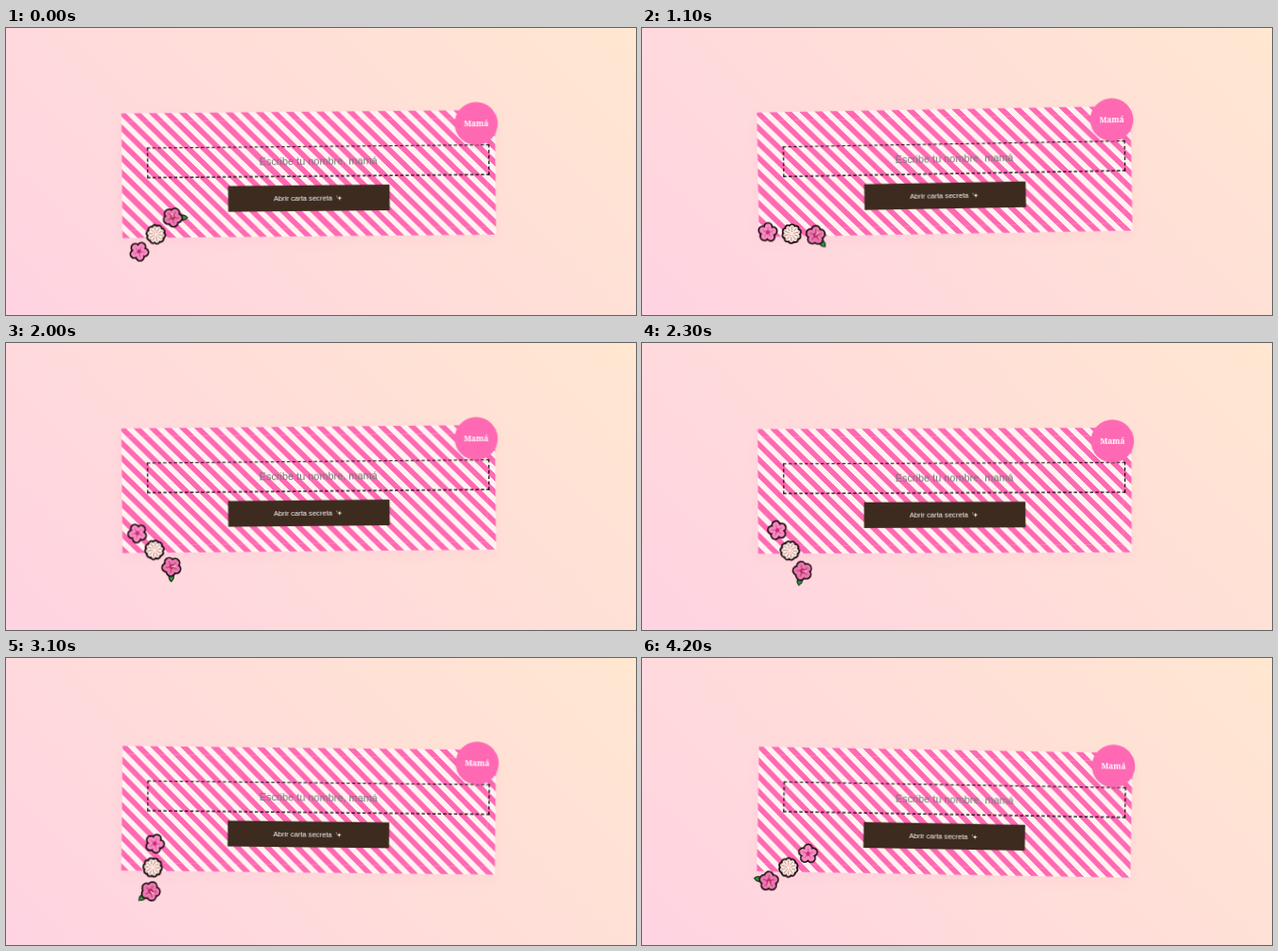
Animation, 666 px wide and 304 px high, one loop 4300 ms. Source, as an HTML page:

```html
<!DOCTYPE html>
<html lang="es">
<head>
<meta charset="utf-8">
<style>
html, body { margin: 0; width: 100%; height: 100%; overflow: hidden; }
body { position: relative; background: linear-gradient(45deg, #ffd3e2, #ffe7d1); font-family: Arial, "Liberation Sans", sans-serif; }
#scene { position: absolute; left: 319.7px; top: 151.75px; transform: scale(.569); }
#card {
  position: absolute; left: -347px; top: -116px; width: 694px; height: 232px;
  box-sizing: border-box; border: 15px solid;
  border-image: repeating-linear-gradient(45deg, #ff69b4 0 10px, #fff3f0 10px 20px) 15 fill;
  box-shadow: 0 10px 24px rgba(255, 105, 180, .07);
}
#card > * { position: absolute; box-sizing: border-box; display: flex; align-items: center; justify-content: center; white-space: pre; }
#name { left: 32px; top: 49px; width: 636px; height: 57px; border: 2px dashed #000; color: #757575; font-size: 19.2px; }
#open { left: 182px; top: 122px; width: 300px; height: 48px; background: #3d2b1f; color: #fff; font-size: 13.333px; }
#badge {
  right: -20px; top: -30px; width: 80px; height: 80px; border-radius: 50%;
  background: #ff69b4; color: #fff; box-shadow: 0 4px 10px rgba(0, 0, 0, .06);
  font: 800 14.6px "Noto Serif", serif;
}
#card > #flowers { left: 0; top: 0; width: 664px; height: 202px; overflow: visible; display: block; }
</style>
</head>
<body>
<div id="scene">
  <div id="card">
    <div id="name">Escribe tu nombre, mamá</div>
    <div id="open">Abrir carta secreta <svg width="18" height="16" fill="#fff8e6"><path d="M10 4l1 3.500 3.500 1-3.500 1-1 3.500-1-3.500-3.500-1 3.500-1z"/><circle cx="5" cy="5" r="1"/></svg></div>
    <div id="badge">Mamá</div>
    <svg id="flowers"><g id="spin"></g></svg>
  </div>
</div>
<script>
const LOOP = 4300, STEP = 100;
const card = document.getElementById('card');
const spin = document.getElementById('spin');

// n circles of radius r placed evenly on a ring
const ring = (n, dist, r, attrs) => Array.from({ length: n }, (_, i) => {
  const a = (i / n) * 2 * Math.PI - Math.PI / 2;
  return `<circle cx="${dist * Math.cos(a)}" cy="${dist * Math.sin(a)}" r="${r}" ${attrs}/>`;
}).join('');

const rays = (n, from, to, color, width) => Array.from({ length: n }, (_, i) =>
  `<path d="M0 ${-from}V${-to}" stroke="${color}" stroke-width="${width}" transform="rotate(${i * 360 / n})"/>`).join('');

const flower = (x, n, dist, r, fill, inside, behind = '') =>
  `<g transform="translate(${x})">${behind}` +
  ring(n, dist, r, 'fill="#1a080c" stroke="#1a080c" stroke-width="6"') +
  ring(n, dist, r, `fill="${fill}"`) +
  `<circle r="${dist}" fill="${fill}"/>${inside}</g>`;

const leaf = '<path d="M6 8Q20 7 19 20Q8 21 6 8Z" fill="#2f9a3c" stroke="#16301a" stroke-width="2"/>';

spin.innerHTML =
  flower(-44.5, 5, 10, 6, '#f58cc2',
    rays(5, 4, 10, '#d9468f', 1.5) + '<circle r="4" fill="#cf2b78"/>') +
  flower(0, 10, 12, 4, '#fff3ea',
    rays(10, 6, 14, '#a8605c', 1.3) + ring(5, 4, 1.2, 'fill="#d9788a"')) +
  flower(44.5, 5, 9.5, 6.8, '#ea78b0',
    rays(5, 2, 11, '#c43a7e', 2) + '<circle r="4.5" fill="#b82a66"/><path d="M0 0L5-6" stroke="#ffd2a0" stroke-width="2"/>', leaf);

const high = { transform: 'rotate(-1deg)', easing: 'ease-in-out' };
const low = { transform: 'translateY(20px) rotate(1deg)', easing: 'ease-in-out' };
const sway = card.animate([high, low, high], { duration: 6000, iterations: Infinity });
sway.pause();

function draw(now) {
  const t = Math.floor((now % LOOP) / STEP) * STEP;
  sway.currentTime = t + 5000;
  spin.setAttribute('transform', `translate(45.2 210) rotate(${t * .045 - 45}) translate(.7 1.900)`);
  requestAnimationFrame(draw);
}
draw(0);
</script>
</body>
</html>
```
